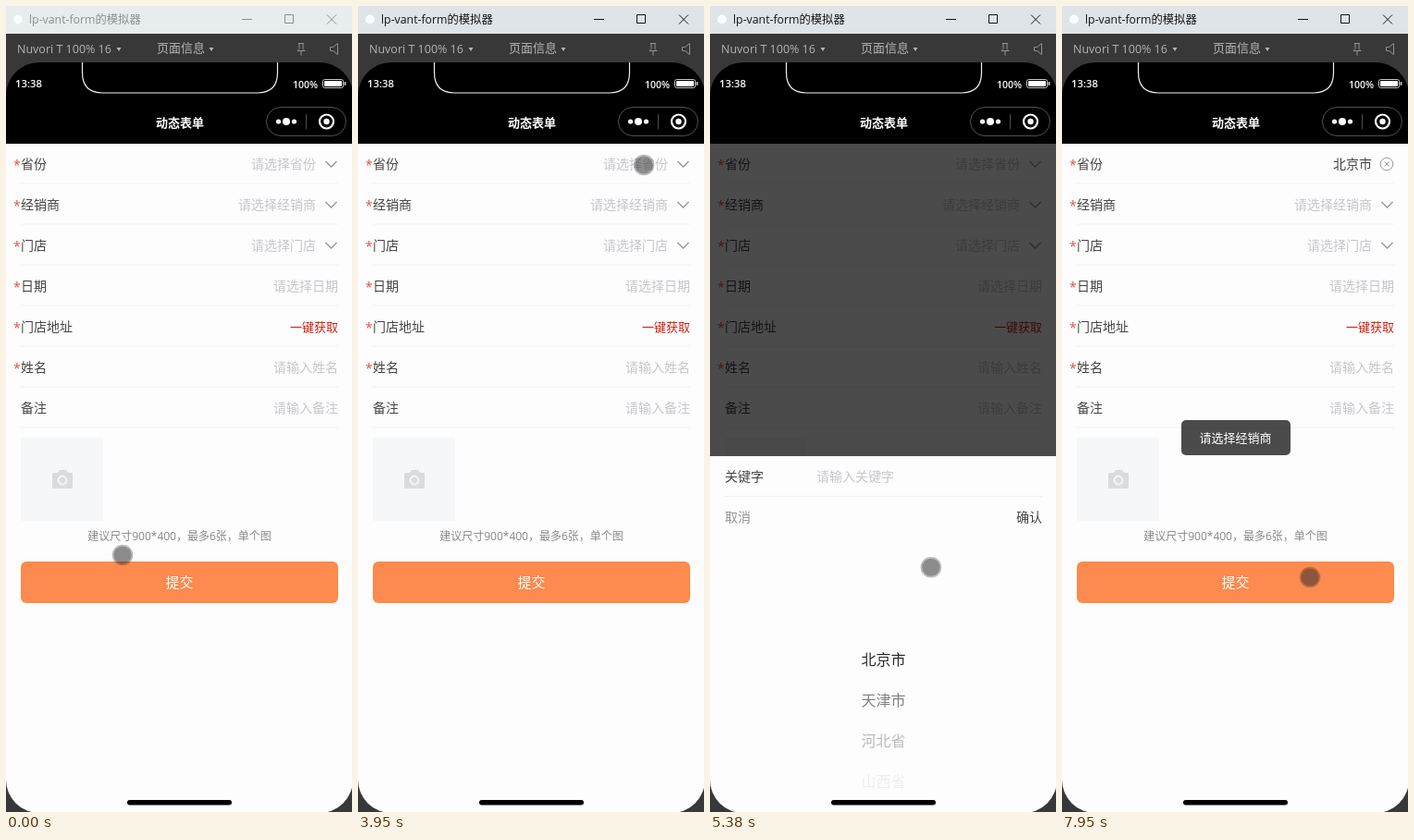
Write an HTML page that moves like this. It is 374 px wide and 872 px high and loops after 8000 ms.

```html
<!DOCTYPE html>
<html lang="zh-CN">
<head>
<meta charset="utf-8">
<title>动态表单</title>
<style>
html, body { margin: 0; width: 100%; height: 100%; overflow: hidden; background: #383838; }
svg { display: block; width: 100%; height: 100%; }
text { font-family: 'Open Sans', 'Noto Sans CJK SC', 'Noto Sans CJK', sans-serif; white-space: pre; }
</style>
</head>
<body>
<svg id="stage" viewBox="0 0 374 872"></svg>
<script>
const INK = '#444', HINT = '#c6c6cc', LINE = '#f2f2f4', PAGE = '#fdfdfd', MUTED = '#888';
const BEZEL = '#383838', LIGHT = '#fdfdfd', ICON = '#98989c';
const SHEET_TOP = 487, SHEET_HEIGHT = 385;

// Text centred vertically on cy
const text = (x, cy, size, fill, str, anchor = 'start', more = '') =>
  `<text x="${x}" y="${cy + size * .37}" font-size="${size}" fill="${fill}" text-anchor="${anchor}" ${more}>${str}</text>`;
const rect = (x, y, w, h, fill, r = 0, more = '') =>
  `<rect x="${x}" y="${y}" width="${w}" height="${h}" fill="${fill}" rx="${r}" ${more}/>`;
const path = (d, stroke, width = 1, more = '') =>
  `<path d="${d}" fill="none" stroke="${stroke}" stroke-width="${width}" ${more}/>`;
const circle = (x, y, r, more = '') => `<circle cx="${x}" cy="${y}" r="${r}" ${more}/>`;

const titleBar = `
  ${rect(0, 0, 374, 30, '#e7ecec', 0, 'id="bar"')}
  ${circle(13, 14.5, 5, 'fill="#f8fbfb"')}
  <g id="title">
    ${text(25, 14.5, 12.3, 'currentColor', 'lp-vant-form的模拟器')}
    ${path('M255 14.5h11M301.5 9.5h9v9h-9zM347 9.5l10 10m0-10l-10 10', 'currentColor')}
  </g>`;

const toolbar = `
  ${text(12, 46, 12.5, '#b4b4b4', 'Nuvori T 100% 16')}
  ${text(163, 45.5, 13, '#b4b4b4', '页面信息')}
  <path d="M119.5 45h5l-2.5 4zM219.5 45h5l-2.5 4z" fill="#b4b4b4"/>
  ${path('M316 40.5h6M317 40.5v6l-2 2h8l-2-2v-6M319 48.5v5M350.5 44.5h3l5-4v12l-5-4h-3z', '#909090')}`;

const phoneHead = `
  ${rect(0, 61, 375, 88, '#000')}
  ${path('M82.5 61v11q0 22 22 22h167q22 0 22-22v-11', '#f0f0f0', 1.2)}
  ${text(10, 84, 11.3, LIGHT, '13:38', 'start', 'font-weight="600"')}
  ${text(337, 85, 10.5, LIGHT, '100%', 'end', 'font-weight="600"')}
  ${rect(342.5, 79.5, 22, 9, 'none', 2, 'stroke="#c8c8c8"')}
  ${rect(344, 81, 19, 6, LIGHT, 1)}
  ${rect(365.5, 82, 2, 4, '#c8c8c8', 1)}
  ${text(188, 126, 13, LIGHT, '动态表单', 'middle', 'font-weight="600"')}
  ${rect(281.5, 109.5, 86, 31, '#000', 15.5, 'stroke="#505050"')}
  <g fill="${LIGHT}">
    ${circle(294.5, 125, 2.6)}${circle(303, 125, 4)}${circle(311.5, 125, 2.6)}${circle(346.5, 125, 3.2)}
  </g>
  ${circle(346.5, 125, 7.5, `fill="none" stroke="${LIGHT}" stroke-width="2.2"`)}
  ${path('M324.5 117v16', '#505050')}`;

const chevron = y => path(`M345.5 ${y - 3}l6 6 6-6`, ICON, 1.4);

function cell([label, hint, select], i) {
  const y = 171 + 44 * i, right = select ? 335 : 359;
  let out = text(16, y, 14, INK, label) + path(`M16 ${y + 21}H359`, LINE);
  if (label != '备注') out += text(8, y + 1, 14, '#e0503c', '*');
  if (hint == '一键获取') return out + text(right, y, 13, '#cc1c10', hint, 'end');
  const empty = text(right, y, 14, HINT, hint, 'end') + (select ? chevron(y) : '');
  return out + (i ? empty : `<g id="empty">${empty}</g>`);
}

const cells = [
  ['省份', '请选择省份', true], ['经销商', '请选择经销商', true], ['门店', '请选择门店', true],
  ['日期', '请选择日期'], ['门店地址', '一键获取'], ['姓名', '请输入姓名'], ['备注', '请输入备注']
].map(cell).join('');

const form = `
  ${rect(0, 149, 375, 724, PAGE)}
  ${rect(0, 149, 375, 44, '#f2f3f5', 0, 'id="hover"')}
  ${cells}
  <g id="filled">
    ${text(335, 171, 14, INK, '北京市', 'end')}
    ${circle(351, 171, 6.8, `fill="none" stroke="${ICON}"`)}
    ${path('M348.5 168.5l5 5m0-5l-5 5', ICON)}
  </g>
  ${rect(16, 467, 89, 90, '#f6f7f8')}
  <path d="M52 505h4l2-3h7l2 3h4q1 0 1 1v14q0 2-2 2H52q-2 0-2-2v-13q0-2 2-2z" fill="#d9dbde"/>
  ${circle(61, 513, 4.4, 'fill="none" stroke="#f6f7f8" stroke-width="2"')}
  ${text(187.5, 573.5, 12, MUTED, '建议尺寸900*400，最多6张，单个图', 'middle')}
  ${rect(16, 601, 343, 45, '#fd8a4e', 6)}
  ${text(187.5, 623.5, 15, LIGHT, '提交', 'middle')}`;

const sheet = `
  <g id="sheet">
    ${rect(0, 0, 375, SHEET_HEIGHT + 1, PAGE)}
    ${text(16, 22, 14, INK, '关键字')}
    ${text(115, 22, 14, HINT, '请输入关键字')}
    ${path('M16 43.5H359', LINE)}
    ${text(16, 66, 14, '#949498', '取消')}
    ${text(359, 66, 14, INK, '确认', 'end', 'id="confirm"')}
    ${[['北京市', '#282828'], ['天津市', '#808080'], ['河北省', '#bababa'], ['山西省', '#eeeeee']]
      .map(([name, fill], i) => text(187.5, 220 + 44 * i, 16, fill, name, 'middle')).join('')}
  </g>`;

const $ = id => document.getElementById(id);

$('stage').innerHTML = `
  <clipPath id="screen">${rect(0, 61, 375, 812, '#000', 36)}</clipPath>
  ${rect(0, 30, 374, 842, BEZEL)}
  ${titleBar}${toolbar}
  <g clip-path="url(#screen)">
    ${phoneHead}${form}
    ${rect(0, 149, 375, 724, '#000', 0, 'id="shade"')}
    ${sheet}
    <g id="toast">
      ${rect(129, 448, 118, 38, '#000', 5, 'id="toastBox" fill-opacity=".7"')}
      ${text(187.5, 467, 13, LIGHT, '', 'middle', 'id="toastText"')}
    </g>
    ${rect(131, 859, 113, 5.5, '#000', 2.7)}
  </g>
  <g id="pointer">
    ${circle(0, 0, 11.3, 'fill="#333" fill-opacity=".32"')}
    ${circle(0, 0, 9.6, 'fill="#222" fill-opacity=".3"')}
  </g>`;

const clamp = v => Math.max(0, Math.min(1, v));

// cubic-bezier(0, 0, .58, 1)
function easeOut(p) {
  let lo = 0, hi = 1;
  for (let i = 0; i < 24; i++) {
    const s = (lo + hi) / 2;
    if (1.74 * (1 - s) * s * s + s ** 3 < p) lo = s; else hi = s;
  }
  return lo * lo * (3 - 2 * lo);
}

// Pointer stops: time, x, y
const stops = [
  [0, 126, 594], [330, 126, 594], [420, 124, 591], [510, 131, 598], [720, 131, 598],
  [800, 137, 605], [880, 130, 596], [1040, 130, 596], [1070, 136, 598], [1180, 136, 598],
  [1210, 147, 611], [1280, 140, 604], [1480, 140, 604], [1780, 196, 630], [2640, 196, 630],
  [2950, 182, 520], [3250, 260, 340], [3470, 338, 206], [3700, 318, 176], [3950, 309, 172],
  [4430, 309, 172], [4560, 309, 182], [4700, 309, 184], [5210, 270, 490], [5500, 217, 690],
  [5650, 225, 682], [6030, 339, 566], [6160, 347, 558], [6600, 347, 558], [6670, 340, 555],
  [7170, 285, 600], [7490, 268, 618], [8000, 268, 618]
];

function pointerAt(t) {
  const i = stops.findIndex(s => s[0] > t);
  const [t0, x0, y0] = stops[i - 1], [t1, x1, y1] = stops[i];
  const k = (t - t0) / (t1 - t0);
  return [x0 + (x1 - x0) * k, y0 + (y1 - y0) * k];
}

const show = (id, on) => $(id).setAttribute('visibility', on ? 'visible' : 'hidden');

function draw(t) {
  const active = t >= 2190;
  $('bar').setAttribute('fill', active ? '#dfe4e8' : '#e7ecec');
  $('title').setAttribute('color', active ? '#141414' : '#8c9090');

  show('hover', t >= 4260 && t < 4420);
  const chosen = t >= 6407;
  show('empty', !chosen);
  show('filled', chosen);

  const open = easeOut(clamp(Math.min(t - 4407, 6707 - t) / 300));
  $('shade').setAttribute('opacity', .7 * open);
  $('sheet').setAttribute('transform', `translate(0 ${SHEET_TOP + SHEET_HEIGHT * (1 - open)})`);
  $('confirm').setAttribute('opacity', t >= 6390 && t < 6500 ? .6 : 1);

  const message = t < 5000 ? '请选择省份' : '请选择经销商';
  const width = message.length * 13 + 40;
  $('toastText').textContent = message;
  $('toastBox').setAttribute('x', 188 - width / 2);
  $('toastBox').setAttribute('width', width);
  const fade = Math.max(Math.min((t - 2170) / 60, (3610 - t) / 100), (t - 7890) / 60);
  $('toast').setAttribute('opacity', clamp(fade));

  $('pointer').setAttribute('transform', `translate(${pointerAt(t)})`);
}

let start;
function frame(now) {
  start ??= now;
  draw((now - start) % 8000);
  requestAnimationFrame(frame);
}
draw(0);
requestAnimationFrame(frame);
</script>
</body>
</html>
```
